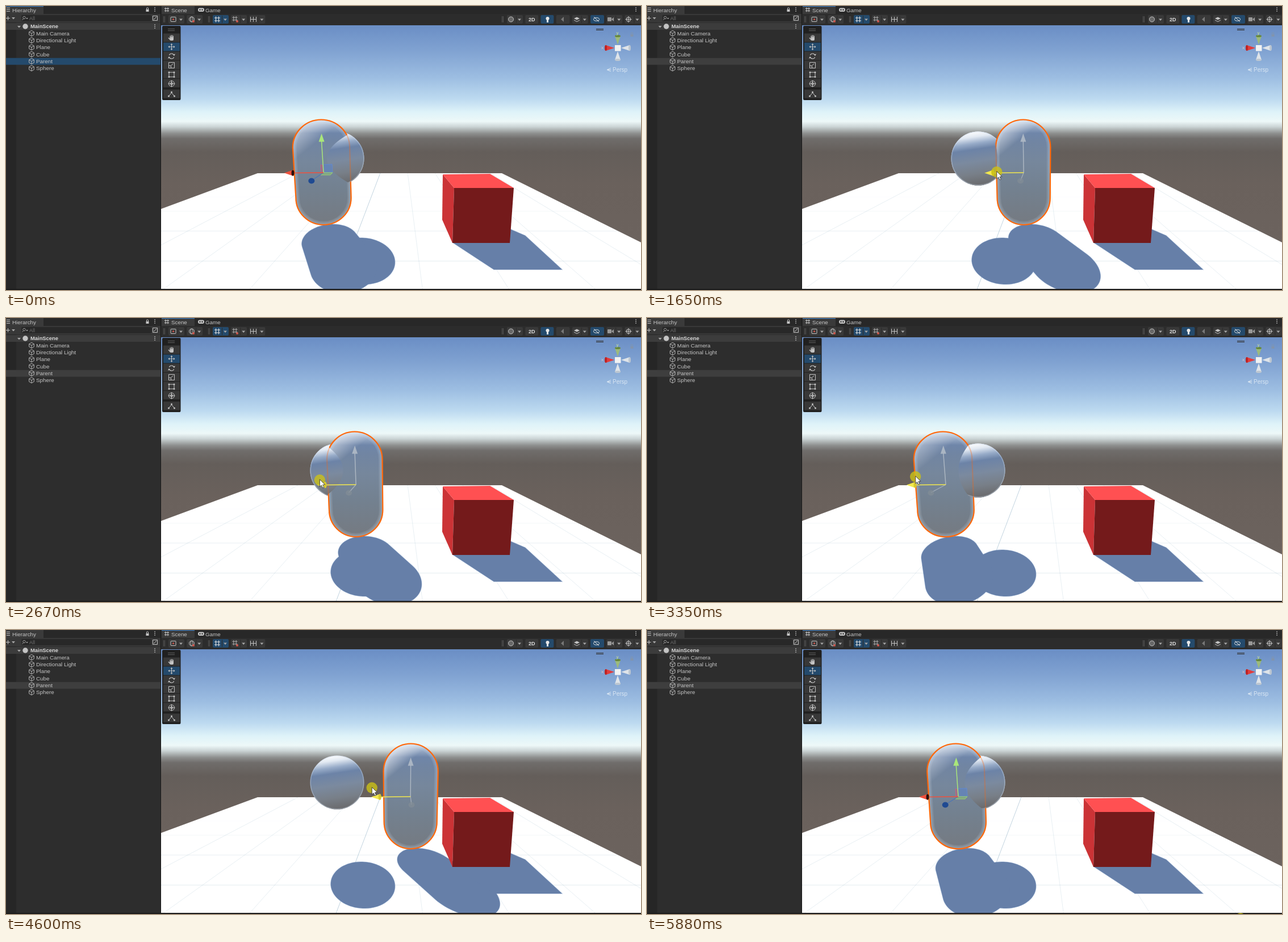
These frames come from a looping animation (1118 by 501 pixels, 6010 ms). An HTML page with a canvas:

```html
<!DOCTYPE html>
<html>
<head>
<meta charset="utf-8">
<style>
html, body { margin: 0; width: 100%; height: 100%; overflow: hidden; background: #282828; }
canvas { display: block; }
</style>
</head>
<body>
<canvas id="stage" width="1118" height="501"></canvas>
<script>
const W = 1118, H = 501, LOOP = 6010, TAU = Math.PI * 2;
const FONT = '"Liberation Sans", Arial, sans-serif';
const stage = document.getElementById('stage').getContext('2d');
const backdrop = document.createElement('canvas');
backdrop.width = W;
backdrop.height = H;
let c = backdrop.getContext('2d');

const GREY = '#c4c4c4', BLUE = '#244a6c';

function rect(x, y, w, h, fill) { c.fillStyle = fill; c.fillRect(x, y, w, h); }
function paint(path, fill, stroke, width = 1) {
  if (fill) { c.fillStyle = fill; c.fill(path); }
  if (stroke) { c.strokeStyle = stroke; c.lineWidth = width; c.stroke(path); }
}
function poly(pts, fill, stroke, width, open) {
  const p = new Path2D();
  for (let i = 0; i < pts.length; i += 2) p.lineTo(pts[i], pts[i + 1]);
  if (!open) p.closePath();
  paint(p, fill, stroke, width);
  return p;
}
function line(x1, y1, x2, y2, color, width = 1) { poly([x1, y1, x2, y2], null, color, width, true); }
function oval(x, y, rx, ry, fill, stroke, width) {
  const p = new Path2D();
  p.ellipse(x, y, rx, ry, 0, 0, TAU);
  paint(p, fill, stroke, width);
}
function dot(x, y, r, fill, stroke, width) { oval(x, y, r, r, fill, stroke, width); }
function box(x, y, w, h, r, fill, stroke) {
  const p = new Path2D();
  p.roundRect(x, y, w, h, r);
  paint(p, fill, stroke);
}
function text(s, x, y, color = GREY, size = 9.8, weight = '') {
  c.font = `${weight} ${size}px ${FONT}`;
  c.fillStyle = color;
  c.fillText(s, x, y);
}
function ramp(x1, y1, x2, y2, ...stops) {
  const g = c.createLinearGradient(x1, y1, x2, y2);
  stops.forEach(([at, color]) => g.addColorStop(at, color));
  return g;
}
function caret(x, y, r = 3) { poly([x - r, y - r / 2, x + r, y - r / 2, x, y + r * .7], '#a8a8a8'); }
function dots(x, y) { for (const d of [-3, 0, 3]) rect(x - .7, y + d - .7, 1.5, 1.5, GREY); }
function lock(x, y, color) {
  rect(x - 2.5, y, 5, 4, color);
  box(x - 1.5, y - 3, 3, 4, 1, null, color);
}
function cross(x, y, r, color = GREY) {
  line(x - r, y, x + r, y, color);
  line(x, y - r, x, y + r, color);
}
function grid(x, y, r, color) {
  for (const d of [-r / 2, r / 2]) {
    line(x + d, y - r, x + d, y + r, color);
    line(x - r, y + d, x + r, y + d, color);
  }
}
function cubeIcon(x, y) {
  const at = (i, r) => [x + r * Math.sin(i * TAU / 6), y - r * Math.cos(i * TAU / 6)];
  const corners = [0, 1, 2, 3, 4, 5].map(i => at(i, 5));
  poly(corners.flat(), null, '#b4b4b4');
  for (const i of [1, 3, 5]) line(x, y, ...corners[i], '#b4b4b4');
}
function item(name, i) {
  const y = 48.3 + i * 12.3;
  cubeIcon(45, y);
  text(name, 53, y + 3.4);
}

// ---------- still parts ----------
function drawWorld() {
  rect(273, 34, 845, 465, ramp(0, 34, 0, 499,
    [0, '#6a8ec5'], [.1, '#81a3d2'], [.2, '#9dbee2'], [.28, '#bddaf0'], [.33, '#dff3f9'],
    [.365, '#edf8f8'], [.385, '#cbd4d5'], [.41, '#8e908f'], [.43, '#706d6b'], [.48, '#645e5a'],
    [.6, '#6a615c'], [1, '#6d645f']));
  c.save();
  const plane = new Path2D('M273 358L443 295H873L1118 417V499H273Z');
  paint(plane, '#fff');
  c.clip(plane);
  for (let i = -3; i < 5; i++) {
    const k = -.38 + i * .508;
    line(695 + k * 95, 295, 695 + k * 300, 500, `rgba(100,145,175,${i ? .15 : .4})`);
  }
  [337, 362, 397, 450].forEach((y, i) => line(273, y, W, y, `rgba(110,150,175,${.02 + i * .06})`));
  c.restore();
}

function drawHierarchy() {
  rect(0, 0, 272, H, '#2d2d2d');
  rect(0, 0, 272, 14, '#282828');
  rect(0, 0, 66, 14, '#3a3a3a');
  rect(0, 14, 272, 15, '#383838');
  rect(0, 29, 18, 470, '#262626');
  rect(0, 30, 272, 12, '#3c3c3c');
  for (const y of [3.5, 6.5, 9.5]) line(1, y, 7, y, GREY);
  text('Hierarchy', 11, 10.5);
  lock(249, 6, GREY);
  dots(262, 6);
  cross(3.5, 21.5, 3.5);
  caret(13, 21.5);
  box(27, 16, 229, 11, 2, '#282828');
  dot(32, 20.5, 2.2, null, '#999');
  line(30.5, 22.5, 28.5, 25, '#999');
  caret(37, 22, 1.8);
  text('All', 41, 24.7, '#6e6e6e', 9);
  box(258.5, 17.5, 8, 8, 0, null, GREY);
  line(260, 24, 265, 19, GREY);
  caret(23, 36.5);
  dot(34, 36, 4.7, GREY);
  text('MainScene', 43, 39.4, '#d8d8d8', 9.4, 'bold');
  dots(262, 36);
  ['Main Camera', 'Directional Light', 'Plane', 'Cube', '', 'Sphere'].forEach((s, i) => s && item(s, i));
}

// Lays buttons side by side; wide ones carry a drop-down arrow.
function buttonRow(x, widths, lit) {
  widths.forEach((w, i) => {
    box(x, 16, w, 15, 2, lit.includes(i) ? BLUE : '#393939');
    if (w > 27) {
      line(x + 16.5, 17, x + 16.5, 30, '#2c2c2c');
      caret(x + 22, 24);
    }
    x += w + 4.2;
  });
}

function drawToolbar() {
  rect(272, 0, 846, 34, '#282828');
  rect(274, 0, 58, 14, '#3a3a3a');
  rect(273, 14, 845, 20, '#2c2c2c');
  rect(272, 0, 1, H, '#191919');
  grid(283, 6.5, 4, GREY);
  text('Scene', 291, 10.5);
  box(338, 3.5, 11, 6.5, 3, GREY);
  for (const x of [341.5, 345.5]) dot(x, 6.7, 1.2, '#282828');
  text('Game', 351, 10.5);
  dots(1109, 6);
  for (const x of [278, 357, 874]) for (const d of [-.5, 1.5]) line(x + d, 18, x + d, 29, '#555');
  buttonRow(286, [28, 28], []);
  buttonRow(364, [28, 28, 28], [0]);
  buttonRow(882, [28, 23, 23, 24, 28, 24, 28, 28], [2, 5]);
  box(290, 19.5, 9, 8, 1, null, GREY);
  dot(294.5, 23.5, 1.5, '#d0564c');
  dot(327, 23.5, 4.5, null, GREY);
  oval(327, 23.5, 2, 4.5, null, GREY);
  grid(372, 23.5, 5, '#e4e4e4');
  grid(403, 22.5, 4.5, '#aaa');
  for (const x of [330, 407]) dot(x, 27, 2, '#d0564c');
  for (const x of [430.5, 435.5, 440.5]) line(x, 19, x, 28, GREY);
  line(431, 23.5, 440, 23.5, GREY);
  dot(889, 23.5, 4.5, '#686868', GREY);
  text('2D', 920, 27, '#ddd', 9, 'bold');
  dot(953.5, 22, 3, '#e8e8e8');
  rect(952, 24, 3, 5, '#e8e8e8');
  poly([977, 23.5, 982, 19, 982, 28], '#777');
  poly([1000, 22, 1005, 19.5, 1010, 22, 1005, 24.5], GREY);
  poly([1000, 25, 1005, 27.5, 1010, 25], null, GREY, 1, true);
  oval(1039.5, 23.5, 5, 2.8, null, '#e8e8e8');
  line(1035, 19.5, 1044, 27.5, '#e8e8e8');
  box(1059, 20, 7, 7, 1, '#999');
  poly([1066, 23.5, 1070, 20, 1070, 27], '#999');
  dot(1096, 23.5, 3.8, null, GREY);
  cross(1096, 23.5, 5.5);
}

function drawPalette() {
  box(275, 35, 32.5, 131, 2, '#202020');
  for (const y of [40.5, 43.5]) line(285, y, 297, y, '#606060');
  for (let i = 0; i < 7; i++) rect(277, 48.5 + i * 16 + (i > 5 ? 3 : 0), 29, 15, i == 1 ? BLUE : '#383838');
  const x = 291.5;
  box(x - 3, 55, 6.5, 6, 2, GREY);
  for (let i = 0; i < 4; i++) line(x - 2.5 + i * 1.8, 51 + Math.abs(i - 1.5), x - 2.5 + i * 1.8, 57, GREY, 1.2);
  line(x - 5.5, 56, x - 2, 60, GREY, 1.3);
  cross(x, 72, 5);
  for (const s of [-1, 1]) {
    poly([x + 6 * s, 72, x + 3.5 * s, 70, x + 3.5 * s, 74], GREY);
    poly([x, 72 + 6 * s, x - 2, 72 + 3.5 * s, x + 2, 72 + 3.5 * s], GREY);
    const arc = new Path2D();
    arc.arc(x, 88.5, 4.5, s > 0 ? .4 : Math.PI + .4, s > 0 ? Math.PI - .2 : TAU - .2);
    paint(arc, null, GREY, 1.2);
    poly([x + 5 * s, 88.5 - s, x + 6.5 * s, 88.5 - 4 * s, x + 2.5 * s, 88.5 - 3 * s], GREY);
    for (const v of [-1, 1]) dot(x + 4.5 * s, 121 + 4 * v, 1.5, GREY);
    dot(x + 5 * s, 159, 1.5, GREY);
    line(x + 5 * s, 159, x, 153, GREY);
  }
  box(x - 5, 99.5, 10, 10, 0, null, GREY);
  box(x - 5, 105.5, 4, 4, 0, null, GREY);
  line(x - 1, 105, x + 3, 101.5, GREY);
  box(x - 4.5, 117, 9, 8, 0, null, GREY);
  dot(x, 137, 5, null, GREY);
  dot(x, 137, 2, null, GREY);
  cross(x, 137, 6);
  dot(x, 152, 1.5, GREY);
}

function drawCompass() {
  const arms = [['#e23b3b', '#bd2222'], ['#9cba7c', '#66883f'], ['#dfe4e9', '#bcc6d1'], ['#dfe4e9', '#bcc6d1']];
  for (const y of [40.5, 42.5]) line(1039, y, 1052, y, '#333');
  lock(1102, 50, '#8194ad');
  arms.forEach(([side, base], i) => {
    c.save();
    c.translate(1077, 74);
    c.rotate(i * TAU / 4);
    poly([-21, -5, -21, 5, -6, 0], side);
    oval(-21, 0, 2, 5, base);
    c.restore();
  });
  rect(1072, 69, 10.5, 10.5, '#f1f2f2');
  text('y', 1074.5, 50, '#c6e29b', 8);
  text('x', 1048, 76, '#e8c4c4', 8);
  text('Persp', 1068, 116.3, '#d9e6f3', 10);
  for (const d of [-3, 0, 3]) line(1058, 112.5, 1065, 112.5 + d, '#d9e6f3');
}

drawWorld();
drawHierarchy();
drawToolbar();
drawPalette();
drawCompass();
rect(0, 499, W, 2, '#1a1a1a');
c = stage;

// ---------- motion ----------
const GRAB = 1030, DROP = 5150, GONE = 5500, PEEK = 5880;
const swing = u => (1 - Math.cos(u * Math.PI)) / 2;
const brake = u => Math.sin(u * Math.PI / 2);

// Each move: start time, end time, goal, easing.
function follow(value, moves, t) {
  for (const [from, to, goal, ease] of moves)
    if (t > from) value += (goal - value) * ease(Math.min(1, (t - from) / (to - from)));
  return value;
}
function capsuleX(t) {
  return follow(559, [[1310, 2200, 743, brake], [2200, 3050, 526, swing],
    [3350, 4180, 798, swing], [4330, 5010, 548, swing]], t);
}
function pointerAt(t) {
  if (t < GRAB) {
    const path = (start, far, goal) => follow(start, [[130, 690, far, swing], [690, GRAB, goal, swing]], t);
    return [path(992, 448, 505), path(459, 272, 292)];
  }
  if (t < DROP) return [capsuleX(t + 25) - 54, 285 + 8 * Math.cos((t - 1400) / 2700 * Math.PI)];
  if (t >= PEEK) return [1045, 509];
  const u = (t - DROP) / (GONE - DROP);
  return [494 + 380 * u, 283 + 216 * u];
}

// ---------- moving parts ----------
const BALL = { x: 583, y: 269, r: 47.5 };
const EYE = { x: 695, y: 200 };
const DARK = '#711a1b';
// Sideways and depth shift of a shadow per unit of height.
const LIGHT = [.45, -.727], SLANT = Math.hypot(...LIGHT);

// Shadow on the ground, in perspective, of a unit sphere at (u, v) swept upward by `rise`.
function castShadow(u, v, rise) {
  const [a, b] = LIGHT.map(k => k / SLANT), p = new Path2D();
  for (let i = 0; i < 90; i++) {
    const q = i / 90 * TAU, side = Math.sin(q);
    const along = Math.cos(q) * Math.hypot(1, SLANT) + (Math.cos(q) > 0 ? rise * SLANT : 0);
    const depth = 1 / (v + .000545 * (along * b + side * a));
    p.lineTo(EYE.x + (u + .215 * (along * a - side * b)) * depth, EYE.y + depth);
  }
  p.closePath();
  return p;
}

function drawShadows(x) {
  const shapes = [castShadow(-.276, .00411, 0), castShadow((x - 672.4) / 193, .00473, 2),
    new Path2D('M786 417L859 465H979L914 405L886 393Z')];
  for (const s of shapes) paint(s, null, 'rgba(120,155,200,.6)', 1.2);
  for (const s of shapes) paint(s, '#667fa8');
}

function drawBall() {
  const { x, y, r } = BALL;
  dot(x, y, r, ramp(x - 9, y - r, x + 5, y + r, [0, '#fff'], [.1, '#e2e9f2'], [.22, '#97abc8'], [.33, '#6c83a7'],
    [.55, '#7b8a9f'], [.78, '#787f88'], [1, '#69696b']));
  dot(x, y, r - .7, null, 'rgba(205,220,238,.4)', 1.4);
}

// The part of the ball that pokes out in front of the capsule.
function drawBallFront(x) {
  let d = x - BALL.x;
  if (Math.abs(d) > 96) return;
  if (Math.abs(d) < 2) d = 2;
  const far = -Math.sign(d) * 300;
  c.save();
  c.beginPath();
  c.moveTo(BALL.x + far, BALL.y - 60);
  for (let y = -60; y <= 60; y += 3) c.lineTo(BALL.x - 6 + d / 2 - y * y / (2 * d), BALL.y + y);
  c.lineTo(BALL.x + far, BALL.y + 60);
  c.clip();
  drawBall();
  c.restore();
}

function capsulePath(x) {
  const lean = (x - EYE.x) / 170, half = 48 + lean * lean * 3.3;
  const p = new Path2D();
  p.ellipse(x + lean * 5, 249.5, half, 49, 0, Math.PI, TAU);
  p.ellipse(x, 338.5, half - 1.5, 47.5, 0, 0, Math.PI);
  p.closePath();
  return p;
}

function drawCapsule(x, path) {
  c.save();
  c.clip(path);
  paint(path, ramp(0, 200, 0, 386, [0, '#d3deeb'], [.05, '#a5b6ce'], [.13, '#6f86a9'], [.22, '#7185a2'],
    [.4, '#76879c'], [.65, '#738190'], [1, '#757a81']));
  const glow = .45 + .5 * (x - 526) / 254;
  paint(path, ramp(x - 38, 208, x - 12, 240, [0, `rgba(255,255,255,${glow})`], [1, 'rgba(255,255,255,0)']));
  for (const w of [5, 9, 13]) paint(path, null, 'rgba(205,218,236,.12)', w);
  c.restore();
}

function drawCubeBack(x, inside) {
  poly([769, 297, 789, 321, 786, 418, 768, 377], inside ? DARK : '#cb3336');
  const top = poly([769, 297, 852, 296, 894, 321, 789, 321], '#ff5052');
  if (!inside) return;
  c.save();
  c.clip(top);
  oval(x + 25, 345, 85, 42, '#79282d');
  c.restore();
}

function drawCubeFront(inside) {
  if (inside) paint(new Path2D('M768 377Q784 372 784 350V315Q808 318 828 311L860 322L786 418Z'), DARK);
  poly([789, 321, 894, 321, 887, 418, 786, 418], '#741a1b');
}

function drawHandles(x, held) {
  const tip = x + (x - EYE.x) * .025, end = x + (x - 700) * .15, y = 294;
  const up = held ? 'rgba(190,198,206,.75)' : '#a9e67a', main = held ? '#f2e84e' : '#f0503c';
  if (!held) {
    poly([x - 5, 280, x + 15, 279, x + 16, 293, x - 4, y], 'rgba(80,130,220,.4)', 'rgba(90,140,230,.6)');
    poly([x - 5, 280, x - 1, 281, x, y, x - 4, y + 1], 'rgba(230,80,80,.4)', 'rgba(240,90,80,.6)');
    poly([x, y, x + 16, y, x + 12, 298, x - 5, 298], 'rgba(150,220,100,.35)', '#9bd36e');
  }
  line(x, y, end, 308, held ? 'rgba(185,193,201,.7)' : '#4d76b4', 1.3);
  oval(end, 308.5, 5.5, 5, held ? 'rgba(130,140,150,.75)' : '#1f4a92');
  line(x, y, tip, 239, up, 1.5);
  poly([tip - 5, 239.5, tip + 5, 239.5, tip, 225], up);
  line(x, y, x - 53, y + .5, main, 1.5);
  poly([x - 69, y + .5, x - 53, y - 5, x - 53, y + 6], main);
  oval(x - 54, y + .5, 2.5, 5, held ? '#d6c72f' : '#28100e');
}

function drawPointer(x, y) {
  dot(x, y, 9.7, 'rgba(205,195,20,.78)');
  c.save();
  c.translate(x, y - 1);
  poly([0, 0, 0, 13, 3, 10.3, 5.2, 15, 7.5, 14, 5.3, 9.5, 9.3, 9.3], '#fff', '#333', .9);
  c.restore();
}

function draw(t) {
  const x = capsuleX(t), picked = t >= GRAB, inside = x > 722;
  c.drawImage(backdrop, 0, 0);
  rect(0, 91.7, 272, 12, picked ? '#3e3e3e' : BLUE);
  item('Parent', 4);
  rect(picked ? 274 : 0, 0, picked ? 58 : 66, 1.2, '#3a79bb');

  c.save();
  c.beginPath();
  c.rect(273, 34, 845, 465);
  c.clip();
  const path = capsulePath(x);
  drawShadows(x);
  drawBall();
  drawCubeBack(x, inside);
  drawCapsule(x, path);
  paint(path, null, '#ff6a0c', 2.2);
  drawBallFront(x);
  drawCubeFront(inside);
  paint(path, null, 'rgba(255,100,10,.33)', 2);
  drawHandles(x, picked && t < DROP);
  c.restore();

  if (t >= 130 && t < GONE || t >= PEEK) drawPointer(...pointerAt(t));
}

const begin = performance.now();
function tick() {
  draw((performance.now() - begin) % LOOP);
  requestAnimationFrame(tick);
}
tick();
</script>
</body>
</html>
```
